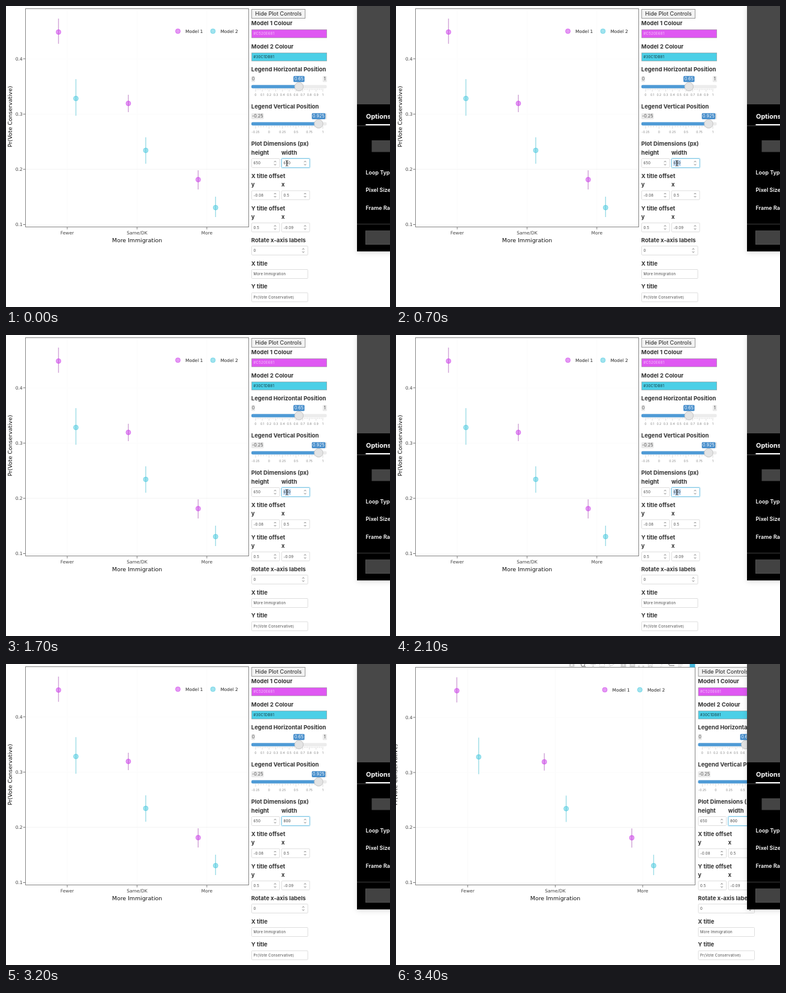
Animation of 640x502 px, one loop 3500 ms. Source, as an HTML page:

```html
<!DOCTYPE html>
<html lang="en">
<head>
<meta charset="utf-8">
<title>Plot controls</title>
<style>
html, body { margin: 0; width: 100%; height: 100%; overflow: hidden; background: #fff; }
svg { display: block; width: 640px; height: 502px; }
text { font-family: Inter, "Open Sans", sans-serif; fill: #333; }
.plot text { font: 7.5px "DejaVu Sans", Verdana, sans-serif; fill: #444; }
.plot .title { font-size: 9.4px; fill: #111; }
.plot .key { font-size: 7.4px; fill: #222; }
.head { font-size: 9.5px; font-weight: 700; }
.val { font-size: 6px; letter-spacing: .25px; fill: #484848; }
.grid { font-size: 5.2px; fill: #888; }
.tag { font-size: 7.3px; }
.mid { text-anchor: middle; }
.end { text-anchor: end; }
.dark text { fill: #fff; font-size: 9px; font-weight: 600; }

/* Hard cuts on a shared 3.5 s loop */
.narrow, .wide, .panel, .picked, .old, .d1, .d2, .d3, .ghost, .bar {
  animation: 3.5s step-end infinite;
}
.narrow { animation-name: narrow; }
.wide { animation-name: wide; }
.panel { animation-name: panel; }
.picked { animation-name: picked; }
.old { animation-name: old; }
.d1 { animation-name: d1; }
.d2 { animation-name: d2; }
.d3 { animation-name: d3; }
.ghost { animation-name: ghost; }
.bar { animation-name: bar; }
@keyframes narrow { 0% { visibility: visible } 94.28%, 100% { visibility: hidden } }
@keyframes wide { 0% { visibility: hidden } 94.28%, 100% { visibility: visible } }
@keyframes panel { 0% { transform: none } 94.28%, 100% { transform: translateX(94.5px) } }
@keyframes picked { 0% { visibility: hidden } 2.85% { visibility: visible } 71.42%, 100% { visibility: hidden } }
@keyframes old { 0% { visibility: visible } 71.42%, 100% { visibility: hidden } }
@keyframes d1 { 0% { visibility: hidden } 71.42%, 100% { visibility: visible } }
@keyframes d2 { 0% { visibility: hidden } 74.28%, 100% { visibility: visible } }
@keyframes d3 { 0% { visibility: hidden } 77.14%, 100% { visibility: visible } }
@keyframes ghost { 0% { visibility: hidden } 94.28% { visibility: visible } 97.14%, 100% { visibility: hidden } }
@keyframes bar { 0% { visibility: hidden } 97.14%, 100% { visibility: visible } }
</style>
</head>
<body>
<svg id="stage" viewBox="0 0 640 502"></svg>
<script>
const PINK = '#c520e6', BLUE = '#30c1db';

const text = (x, y, s, cls = '', more = '') => `<text x="${x}" y="${y}" class="${cls}" ${more}>${s}</text>`;
const rect = (x, y, w, h, fill, more = '') => `<rect x="${x}" y="${y}" width="${w}" height="${h}" fill="${fill}" ${more}/>`;
const path = (d, stroke, width = 1, more = '') => `<path d="${d}" fill="none" stroke="${stroke}" stroke-width="${width}" ${more}/>`;
const group = (cls, ...parts) => `<g class="${cls}">${parts.join('')}</g>`;
const dot = (x, y, color) =>
  `<circle cx="${x}" cy="${y}" r="4" fill="${color}" fill-opacity=".46" stroke="${color}" stroke-opacity=".45"/>`;

// Estimates: centre, interval top, interval bottom
const models = [
  { color: PINK, line: '#cfa2d6', side: -1, pts: [[43.4, 21, 63], [162.4, 148, 177], [289.6, 274, 306]] },
  { color: BLUE, line: '#9bdce6', side: 1, pts: [[154.2, 122, 183], [240.8, 219, 263], [336.2, 318, 352]] }
];

function plot(cls, o) {
  const { top, right, first, step, spread, legend, titleX, lift } = o;
  const xs = [0, 1, 2].map(i => first + step * i);
  const ys = [364.5, 272.3, 180.3, 88].map((y, i) => y + lift * i / 3);
  const out = [];
  xs.forEach(x => out.push(path(`M${x} ${top + 1}V368`, '#fafafa')));
  ys.forEach((y, i) => out.push(path(`M33 ${y}H${right}`, i === 1 ? '#f3f3f3' : '#fcfcfc')));
  out.push(rect(32.5, top, right - 32.5, 368.5 - top, 'none', 'stroke="#858585"'));
  ys.forEach((y, i) => {
    out.push(path(`M28.5 ${y}H32`, '#777'));
    out.push(text(27.6, y + 2.8, `0.${i + 1}`, 'end'));
  });
  ['Fewer', 'Same/DK', 'More'].forEach((s, i) => {
    out.push(path(`M${xs[i]} 369V372.5`, '#777'), text(xs[i], 380.5, s, 'mid'));
  });
  models.forEach((m, k) => {
    m.pts.forEach(([y, a, b], i) => {
      const x = xs[i] + m.side * spread, dy = lift * (364 - y) / 276;
      out.push(path(`M${x} ${a + dy}V${b + dy}`, m.line, 1.4), dot(x, y + dy, m.color));
    });
    const x = legend + 58.4 * k;
    out.push(dot(x, 42 + lift, m.color), text(x + 12.5, 44.8 + lift, `Model ${k + 1}`, 'key'));
  });
  out.push(text((32.5 + right) / 2, 394, 'More Immigration', 'title mid'));
  out.push(text(0, 0, 'Pr(Vote Conservative)', 'title mid', `transform="translate(${titleX} 184.5) rotate(-90)"`));
  return group('plot ' + cls, ...out);
}

function field(x, y, w, value, spin, stroke = '#ddd') {
  const cx = x + w - 7.5, cy = y + 7.5;
  return rect(x, y, w, 15, '#fff', `rx="1" stroke="${stroke}"`) +
    text(x + 3, y + 9.9, value, 'val') +
    (spin ? path(`M${cx - 1.6} ${cy - 1.5}l1.6 -2l1.6 2M${cx - 1.6} ${cy + 1.5}l1.6 2l1.6 -2`, '#777', .9) : '');
}

const pair = (y, a, b) => field(409.5, y, 46.5, a, true) + field(459.5, y, 46.5, b, true);

function swatch(y, fill, code, ink) {
  return rect(409.5, y + .5, 125, 13.5, fill, 'stroke="#888" stroke-opacity=".55"') +
    text(412.5, y + 9.4, code, 'val', `style="fill:${ink}"`);
}

function slider(y, knob, value, min, max, marks, minor) {
  const gap = 112 / (marks.length - 1);
  const tag = (x, w, s, fill, ink) =>
    rect(x - w / 2, y - 17.5, w, 10, fill, 'rx="1.5"') + text(x, y - 9.8, s, 'tag mid', `style="fill:${ink}"`);
  const ticks = Array.from({ length: (marks.length - 1) * minor + 1 }, (_, i) =>
    `M${416 + gap * i / minor} ${y + 3.5}v${i % minor ? 2.5 : 5}`).join('');
  const minW = min.length * 3.6 + 2.5;
  return path(ticks, '#ccc', .7) +
    rect(409, y - 2.4, 125.5, 5.4, '#ececec', 'rx="2"') +
    rect(409, y - 2.4, knob - 409, 5.4, '#4f9bd6', 'rx="2"') +
    `<circle cx="${knob}" cy="${y + .3}" r="7.2" fill="#e4e4e4" stroke="#c4c4c4"/>` +
    tag(409 + minW / 2, minW, min, '#e9e9e9', '#555') +
    tag(531.3, 7, max, '#e9e9e9', '#555') +
    tag(knob, value.length * 4.1 + 2, value, '#428bca', '#fff') +
    marks.map((s, i) => text(416 + gap * i, y + 16, s, 'grid mid')).join('');
}

function controls() {
  const heads = [
    ['Model 1 Colour', 31.8], ['Model 2 Colour', 70.8], ['Legend Horizontal Position', 109.4],
    ['Legend Vertical Position', 171.4], ['Plot Dimensions (px)', 233.3], ['height', 247.7],
    ['X title offset', 286.6], ['y', 301], ['Y title offset', 340.6], ['y', 354.8],
    ['Rotate x-axis labels', 394], ['X title', 432.5], ['Y title', 471.3]
  ].map(([s, y]) => text(408.8, y, s, 'head'));
  const seconds = [['width', 247.7], ['x', 301], ['x', 354.8]].map(([s, y]) => text(459, y, s, 'head'));
  const tenths = Array.from({ length: 11 }, (_, i) => String(i / 10));
  const typed = '<tspan class="d1">8</tspan><tspan class="d2">0</tspan><tspan class="d3">0</tspan>';
  return group('panel',
    rect(409.5, 5.5, 89, 15, '#f2f2f2', 'stroke="#999"'),
    text(454, 16.4, 'Hide Plot Controls', 'mid', 'style="font-size:9.1px;fill:#222"'),
    ...heads, ...seconds,
    swatch(39, '#df58f2', '#C520E681', '#f5c8fa'),
    swatch(77.7, '#4bcfe7', '#30C1DB81', '#16383f'),
    slider(134.2, 488.3, '0.65', '0', '1', tenths, 4),
    slider(196.2, 521, '0.925', '-0.25', '1', ['-0.25', '0', '0.25', '0.5', '0.75', '1'], 5),
    field(409.5, 254.5, 46.5, '650', true),
    rect(458.7, 253.7, 48.1, 16.6, 'none', 'rx="2" stroke="#d5edf7" stroke-width="1.6"'),
    field(459.5, 254.5, 46.5, '', true, '#80c8e6'),
    group('picked', rect(462, 257, 12.8, 10, '#c3dbf3')),
    text(462.5, 264.4, '650', 'val old'),
    text(462.5, 264.4, typed, 'val', 'style="fill:#333"'),
    group('old', path('M466 257.5q2.2 0 2.2 1.5v6.5q0 1.5 -2.2 1.5M470.4 257.5q-2.2 0 -2.2 1.5v6.5q0 1.5 2.2 1.5', '#333', .9)),
    pair(308, '-0.08', '0.5'), pair(361.8, '0.5', '-0.09'),
    field(409.5, 400.3, 93.5, '0', true),
    field(409.5, 439.5, 93.5, 'More Immigration'),
    field(409.5, 478.2, 93.5, 'Pr(Vote Conservative)'));
}

// Toolbar cut off by the top edge of the stage
function toolbar() {
  const ink = '#d2d2d2', deep = '#999';
  return group('bar',
    rect(288.5, 0, 9, 4.5, ink, 'rx="1"') + '<circle cx="293" cy="1.8" r="1.5" fill="#fff"/>',
    `<circle cx="311.5" cy="1" r="3" fill="none" stroke="${deep}" stroke-width="1.4"/>`, path('M313.5 3l3.5 3', deep, 1.6),
    path('M324 1H333M328.5 0V5M327 3.5l1.5 1.8l1.5 -1.8', ink),
    path('M339.5 0V4.5H347.5V0', ink, 1, 'stroke-dasharray="2 1"'),
    path('M355 0q0 3 4 2.5t4 -2.5M357 2.5l-1 3', ink),
    rect(374.5, 0, 9, 5, ink), path('M379 0V3.5', '#fff'),
    rect(389.5, 0, 9, 5, ink), path('M391.5 1.5h5', '#fff'),
    path('M404 4.5l3 -3M413 4.5l-3 -3M404 2v2.5h2.5M413 2v2.5h-2.5', ink),
    path('M420.5 0V4.5H422.5V2H425V4.5H427V0', ink, 1.2),
    path('M443 0V4M440.5 4.5h1', ink, 1, 'stroke-dasharray="2 1"'),
    path('M454 1l2 -1.5M455 2.5H464', deep, 1.6),
    path('M470 1.5H478M470 4H476', ink, 1.2),
    rect(489.5, 0, 9, 5.5, '#45b8dc'));
}

const ghost = group('ghost',
  path('M455 1h8M459 3.5h9M470 .8l5 3', '#e2eff2', 1.4),
  rect(489, 0, 8, 5, '#d6edf3'));

const overlay = group('dark',
  rect(585, 0, 60, 409.3, '#000', 'style="filter:drop-shadow(0 2px 4px rgba(0,0,0,.14))"'),
  rect(585, 0, 56, 164, '#484848'),
  text(600, 188, 'Options', '', 'style="font-size:10.9px;font-weight:700"'),
  path('M585 199.8H640', '#4a4a4a'),
  path('M599.5 198H640', '#fff', 2.2),
  rect(609.5, 224, 40, 19.5, '#444'),
  text(599.5, 280.6, 'Loop Type'), text(599.5, 310, 'Pixel Size'), text(599.5, 339.7, 'Frame Rate'),
  path('M585 363.8H640', '#444'),
  rect(599.5, 375, 50, 22.5, '#424242', 'stroke="#505050"'));

document.getElementById('stage').innerHTML =
  plot('narrow', { top: 4.5, right: 404.5, first: 102, step: 116.4, spread: 14.5, legend: 286.5, titleX: 10, lift: 0 }) +
  plot('wide', { top: 5.5, right: 498.5, first: 119.6, step: 145.8, spread: 18.2, legend: 348, titleX: 1.9, lift: 1 }) +
  ghost + toolbar() + controls() + overlay;
</script>
</body>
</html>
```
